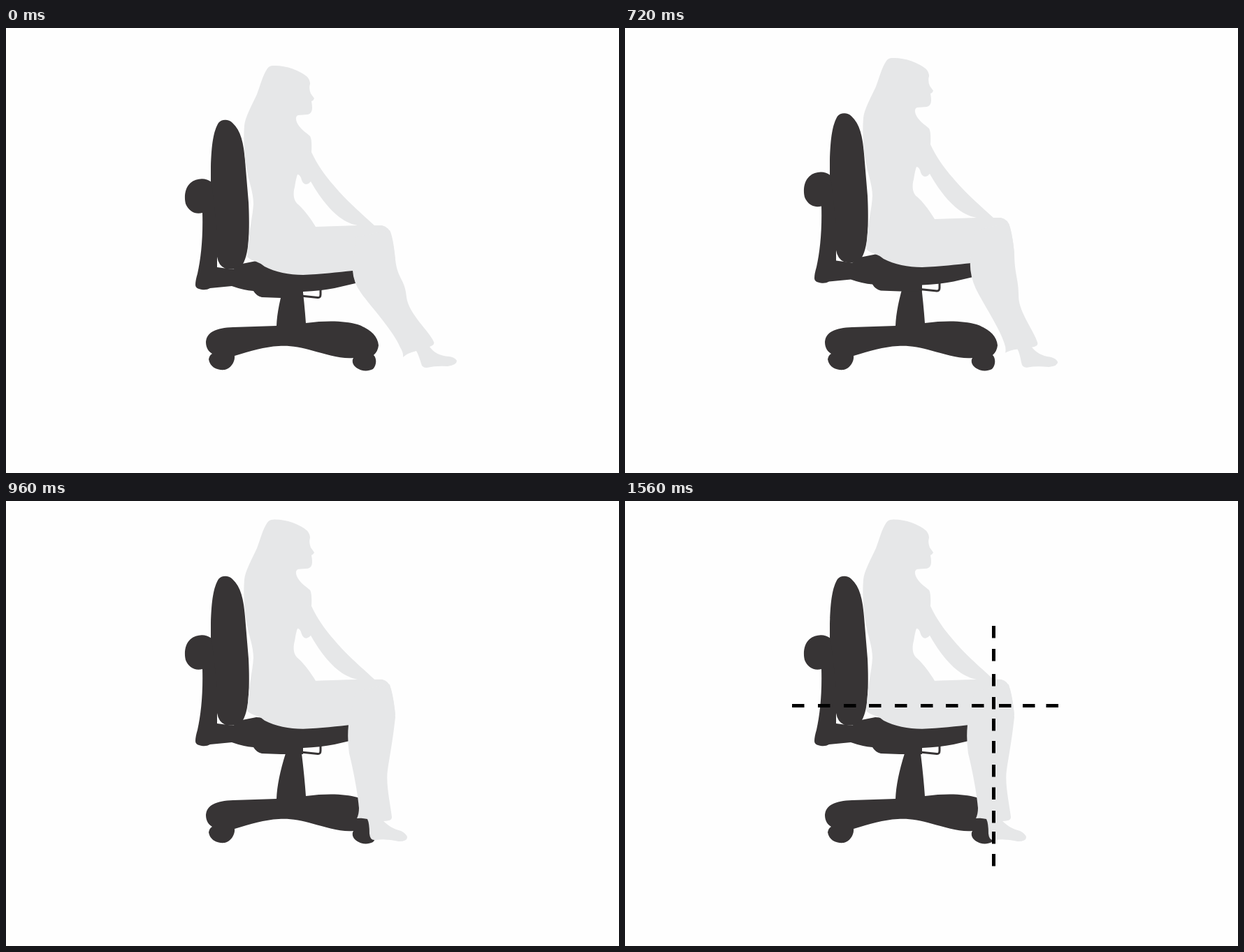
Write an HTML page that moves like this. It is 877 px wide and 638 px high and loops after 3.6 s.

```html
<!DOCTYPE html>
<html lang="en">
<head>
<meta charset="utf-8">
<title>Seat height</title>
<style>
  html, body { margin: 0; width: 100%; height: 100%; overflow: hidden; background: #fefefe; }
  svg { display: block; width: 100vw; height: 100vh; }
  .chair { fill: #373435; }
  .body { fill: #e6e7e8; }
</style>
</head>
<body>
<svg viewBox="0 0 877 638">
  <g class="chair">
    <!-- base with casters and column -->
    <path d="M286 450C287 436 300 430 325 429L387 427Q388 400 400 362L423 362Q427 395 429 423C460 419 485 420 503 425
      C520 431 532 441 533 455Q532 464 526 469C531 474 530 484 525 489C517 493 507 492 500 486C495 482 495 476 497 473
      C480 475 455 467 440 463C420 457 405 455 390 456C370 457 350 463 327 470C328 478 322 488 313 490
      C303 491 292 487 290 475Q291 469 295 467C288 463 286 456 286 450Z"/>
    <g id="seat">
      <path d="M304 136C308 131 318 130 324 136C336 147 340 165 342 190L347 250C348 270 348 290 347 302
        C346 322 342 335 337 341C328 347 322 346 314 345Q304 341 302 328L293 290V200C294 165 297 148 304 136Z"/>
      <path d="M294 221C286 214 272 215 264 222C255 230 255 244 257 252C261 262 270 268 281 265
        C282 300 279 330 274 352Q271 362 271 368C271 372 274 374 280 375Q287 376 292 373L323 370
        Q340 376 354 377Q358 384 366 386L393 387H425V378Q450 377 470 373L500 366V345L358 334L338 338L325 346L302 343V290Z"/>
      <path d="M422 384L446 386.500Q450 387 450 382V374" fill="none" stroke="#373435" stroke-width="3"/>
    </g>
  </g>
  <g class="body">
    <path id="torso" fill-rule="evenodd" d="M374 58Q377 54 382 54C398 53 420 60 431 70Q435 75 435 80Q433 87 436 94L441 101
      Q440 104 437 105Q438 110 438 115Q438 122 432 124L418 125Q413 127 416 135C420 144 428 149 435 155Q438 160 437 178
      C445 195 455 210 470 227C485 245 505 263 527 283L538 283Q548 285 551 297Q555 312 557 334L496 348
      C475 350 450 353 425 354C405 354 385 350 370 342Q364 337 358 335Q350 333 345 328L347 305C348 290 353 270 354 252
      C354 235 347 220 344 200C342 190 339 165 341 140C342 128 352 110 359 95C364 82 367 68 374 58Z
      M417 210Q421 210 423 218Q425 224 430 224Q434 223 436 220C450 245 468 268 488 278Q495 282 503 283L443 285
      C437 275 428 262 418 253C410 247 411 235 413 228Q415 215 417 210Z"/>
    <path id="leg"/>
  </g>
  <path id="lines" stroke="#000" stroke-width="5"/>
</svg>
<script>
const LOOP = 3600, STEP = 40;
const legOut = "M500 300L496 348Q497 365 508 380C520 397 555 435 564 458Q569 466 568 472Q574 466 587 463" +
  "Q590 468 594 481Q595 487 602 487Q615 484 632 485Q645 483 645 477Q642 472 634 471C620 470 612 465 606 457" +
  "Q614 454 612 450C606 435 576 410 573 386C571 360 560 360 557 332Q554 300 549 290Z";
const legIn = "M500 273L490 321Q488 340 491 362C498 390 504 425 505 440Q505 449 502 455Q509 454 517 456" +
  "Q520 462 520 477Q521 487 528 486Q545 484 562 488Q574 488 574 482Q573 477 565 473C553 470 548 466 540 459" +
  "Q553 459 552 453C550 435 543 405 546 386C550 360 553 345 557 310Q556 290 549 263Z";
const dashX = [239, 276, 313, 349, 386, 423, 459, 496, 535, 569, 602.5];
const dashY = [179, 212, 248, 281, 312, 344, 378, 410.5, 444, 474, 506];

const el = id => document.getElementById(id);
const stepsSince = (t, start) => Math.max(0, Math.min(11, Math.floor((t - start) / STEP) + 1));
const raise = (id, y) => el(id).setAttribute("transform", `translate(0 ${-y})`);

function morph(from, to, k) {
  const ends = to.match(/\d+/g);
  let i = 0;
  return from.replace(/\d+/g, n => (+n + (ends[i++] - n) * k).toFixed(2));
}

function draw() {
  const t = performance.now() % LOOP;
  const lift = Math.max(0, stepsSince(t, 560) - 1) / 10;
  raise("seat", 24 * lift);
  raise("torso", 27.3 * lift);
  // the leg swings a little slower and snaps into its resting pose
  el("leg").setAttribute("d", morph(legOut, legIn, lift < 1 ? lift * 0.91 : 1));

  const shown = stepsSince(t, 1160);
  el("lines").setAttribute("d",
    dashX.slice(0, shown).map(x => `M${x} 293.500h17.500`).join("") +
    dashY.slice(0, shown).map(y => `M527.500 ${y}v17.500`).join(""));
  requestAnimationFrame(draw);
}
draw();
</script>
</body>
</html>
```
